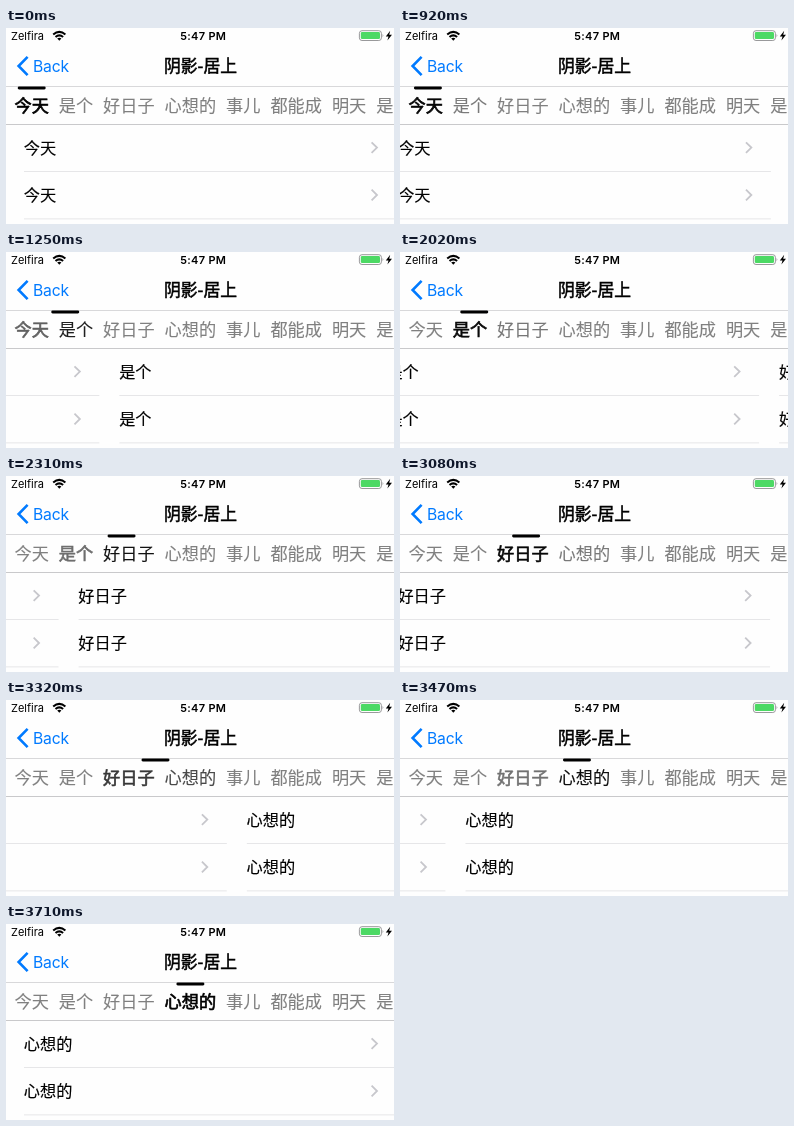
An HTML page that plays this animation: 388 by 196 pixels, repeating every 4410 ms.

```html
<!DOCTYPE html>
<html lang="zh-CN">
<head>
<meta charset="utf-8">
<title>Paged tabs</title>
<style>
  html, body { margin: 0; width: 100%; height: 100%; overflow: hidden; background: #fefefe; }
  svg { display: block; width: 388px; height: 196px; }
  text { font-family: "Noto Sans CJK SC", "Noto Sans CJK", "Noto Sans CJK JP", sans-serif; }
  .latin { font-family: Inter, Roboto, sans-serif; }
</style>
</head>
<body>
<svg id="stage" viewBox="0 0 388 196">
  <rect width="388" height="196" fill="#fefefe"/>
  <g id="pages"></g>
  <rect width="388" height="96" fill="#fefefe"/>
  <path d="M0 58.5H388" stroke="#d8d8da"/>
  <path d="M0 96.5H388" stroke="#c9c9cb"/>

  <text class="latin" x="5" y="12" font-size="11">Zelfira</text>
  <g fill="none" stroke="#000" stroke-width="2">
    <path d="M47.2 6.6Q53.3 1.2 59.4 6.6"/>
    <path d="M49.5 9.1Q53.3 5.6 57.1 9.1"/>
  </g>
  <path d="M51.2 10.6Q53.3 9 55.4 10.6L53.3 12.8Z"/>
  <text class="latin" x="197.3" y="12" font-size="11" font-weight="600" letter-spacing=".3" text-anchor="middle">5:47 PM</text>
  <rect x="353.4" y="2.7" width="22" height="9.8" rx="2.6" fill="none" stroke="#8e8e90" stroke-width=".9"/>
  <rect x="354.8" y="4.1" width="19.2" height="7" rx="1.4" fill="#4cd964"/>
  <path d="M376.6 5.8Q378.2 7.6 376.6 9.4Z" fill="#8e8e90"/>
  <path d="M384.2 2.8L379.8 8.4H382.5L381.4 12.6L386 6.8H383.2Z"/>

  <path d="M21.6 28.8L12.6 38L21.6 47.2" fill="none" stroke="#007aff" stroke-width="2.6"/>
  <text class="latin" x="27" y="43.5" font-size="15.7" letter-spacing="-.2" fill="#007aff">Back</text>
  <text x="194.5" y="44.2" font-size="16.8" stroke="#000" stroke-width=".5" text-anchor="middle">阴影-居上</text>

  <g id="tabs"></g>
  <rect id="bar" y="58.6" width="28" height="2.8" rx="1.4"/>
</svg>
<script>
const LOOP = 4410, PAGE_WIDTH = 392.5, TAB_SIZE = 17.2, TAB_GAP = 9.9, BAR_WIDTH = 28, GRAY = 128;
const labels = ["今天", "是个", "好日子", "心想的", "事儿", "都能成", "明天", "是"];

// Each swipe is dragged from `from` to `to`, then decays to the next page.
const swipes = [
  { from: .05, to: .757, release: 1250, power: 1.8, tau: 40,
    steps: [920, 980, 1040, 1100, 1160, 1220, 1250, 1310, 1370, 1400, 1450, 1510] },
  { from: .08, to: .861, release: 2310, power: 1.2, tau: 47,
    steps: [2020, 2080, 2140, 2200, 2250, 2310, 2340, 2400, 2450, 2510] },
  { from: .052, to: .879, release: 3470, power: 1.6, tau: 34,
    steps: [3080, 3140, 3200, 3260, 3320, 3380, 3440, 3470, 3500, 3560, 3590, 3650, 3710] }
];

const byId = id => document.getElementById(id);

function add(parent, name, attrs, text = "") {
  const node = document.createElementNS("http://www.w3.org/2000/svg", name);
  for (const key in attrs) node.setAttribute(key, attrs[key]);
  node.textContent = text;
  return parent.appendChild(node);
}

let nextX = 8.5;
const tabs = labels.map(label => {
  const width = label.length * TAB_SIZE;
  const node = add(byId("tabs"), "text", { x: nextX, y: 83.9, "font-size": TAB_SIZE }, label);
  const center = nextX + width / 2;
  nextX += width + TAB_GAP;
  return { node, center };
});

labels.slice(0, 4).forEach((label, i) => {
  const page = add(byId("pages"), "g", { transform: `translate(${i * PAGE_WIDTH} 0)` });
  for (const y of [119.6, 167]) {
    add(page, "text", { x: 17.8, y: y + 6.1, "font-size": 16.2, stroke: "#000", "stroke-width": .15 }, label);
    add(page, "path", { d: `M365.6 ${y - 5.3}l5.4 5.3l-5.4 5.3`, fill: "none", stroke: "#c7c7cc", "stroke-width": 1.8 });
    add(page, "path", { d: `M18 ${y + 23.9}H${PAGE_WIDTH - 2}`, stroke: "#e6e6e8" });
  }
});

function swipeProgress({ from, to, release, power, tau, steps }, time) {
  const start = steps[0], end = steps[steps.length - 1];
  if (time < start) return 0;
  if (time >= end) return 1;
  const t = steps.filter(step => step <= time).pop();
  if (t <= release) return from + (to - from) * ((t - start) / (release - start)) ** power;
  return 1 - (1 - to) * Math.exp((release - t) / tau);
}

function render(time) {
  const position = swipes.reduce((sum, swipe) => sum + swipeProgress(swipe, time), 0);
  const selected = Math.floor(position), fraction = position - selected;
  const here = tabs[selected].center, next = tabs[selected + 1].center;

  byId("pages").setAttribute("transform", `translate(${-position * PAGE_WIDTH} 0)`);
  byId("bar").setAttribute("x", here + (next - here) * fraction - BAR_WIDTH / 2);
  tabs.forEach(({ node }, i) => {
    const shade = Math.round(GRAY * Math.min(1, Math.abs(i - position)));
    const color = `rgb(${shade},${shade},${shade})`;
    node.setAttribute("fill", color);
    node.setAttribute("stroke", color);
    node.setAttribute("stroke-width", i === selected ? .65 : .12);
  });
}

const origin = performance.now();
function tick() {
  render((performance.now() - origin) % LOOP);
  requestAnimationFrame(tick);
}
tick();
</script>
</body>
</html>
```
